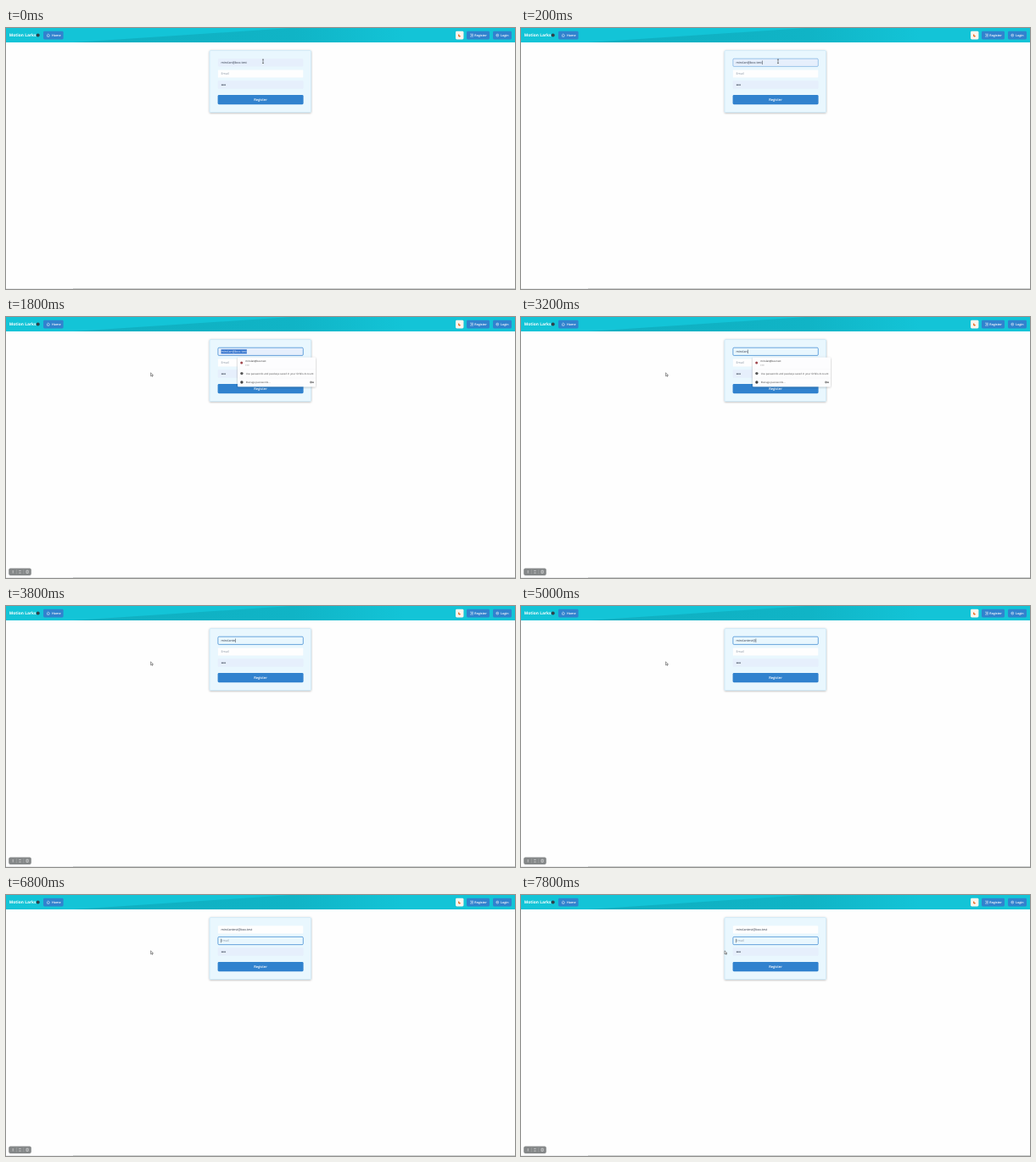
These frames come from a looping animation (600 px wide and 308 px high, 8 s). An HTML page:

```html
<!DOCTYPE html>
<html lang="en">
<head>
<meta charset="utf-8">
<title>Register form</title>
<style>
  html, body { margin: 0; width: 100%; height: 100%; overflow: hidden; background: #fefefe; }
  svg { display: block; width: 600px; height: 308px; }
  text { font: 3.7px "Open Sans", "Noto Sans", sans-serif; fill: #2d3748; text-rendering: geometricPrecision; white-space: pre; }
  .bold { font-weight: 600; fill: #fff; }
  .brand { font-size: 4.8px; font-weight: 700; fill: #fff; }
  .hint { fill: #8c97a6; }
  .small { font-size: 2.95px; fill: #444; }
  .btn { fill: #3182ce; }
  .line { fill: none; stroke: #fff; stroke-width: .5; }
</style>
</head>
<body>
<svg viewBox="0 0 600 308">
  <defs>
    <linearGradient id="wave">
      <stop offset="0" stop-color="#0fafc1"/>
      <stop offset=".5" stop-color="#10b4c6"/>
      <stop offset=".75" stop-color="#13c4d7"/>
    </linearGradient>
    <filter id="shade" x="-10%" y="-10%" width="120%" height="130%">
      <feDropShadow dx="0" dy=".7" stdDeviation=".9" flood-opacity=".3"/>
    </filter>
  </defs>

  <!-- header -->
  <path fill="#13c4d7" d="M0 0H600V17H0z"/>
  <path fill="url(#wave)" d="M79 17L335 0H600V17z"/>
  <text class="brand" x="3.8" y="10.4">Motion Larks</text>
  <circle cx="37.7" cy="8.6" r="2" fill="#30404a"/>
  <g class="btn">
    <rect x="44" y="3.8" width="23.6" height="9.6" rx="1.4"/>
    <rect x="543" y="3.8" width="27" height="9.6" rx="1.4"/>
    <rect x="574" y="3.8" width="22" height="9.6" rx="1.4"/>
  </g>
  <rect x="530" y="3.8" width="9.4" height="9.6" rx="1.4" fill="#fff5ee"/>
  <path d="M534.2 7.1A1.7 1.7 0 1 0 536.3 9.3A1.7 1.7 0 0 1 534.2 7.1z" fill="#dd6b20"/>
  <path class="line" d="M48 8.6L49.8 7L51.6 8.6M48.6 8.4V10.2H51V8.4"/>
  <path class="line" d="M547 7.2H551M548 8.6H551M547 10H551"/>
  <circle class="line" cx="579.3" cy="8.6" r="1.5"/>
  <path class="line" d="M578.2 8.6H580.2"/>
  <text class="bold" x="54" y="9.9">Home</text>
  <text class="bold" x="552.3" y="9.9" >Register</text>
  <text class="bold" x="583" y="9.9">Login</text>

  <!-- form -->
  <rect x="240" y="26.6" width="119.6" height="73" rx="1.2" fill="#e9f7fe" stroke="#bfe3f5" stroke-width=".6" filter="url(#shade)"/>
  <rect id="userBox" x="249.9" y="36.2" width="100.4" height="9.2" rx="1.2"/>
  <rect id="mailBox" x="249.9" y="49.4" width="100.4" height="9.2" rx="1.2"/>
  <rect x="249.6" y="62.2" width="101" height="9.6" rx="1.2" fill="#e6effc"/>
  <rect id="mark" x="253.5" y="38.3" height="5" fill="#2f70cc"/>
  <text id="user" x="253.5" y="42.1"></text>
  <text class="hint" x="253.5" y="55.3">Email</text>
  <g fill="#2d3748">
    <circle cx="254.4" cy="67.1" r=".65"/><circle cx="255.7" cy="67.1" r=".65"/>
    <circle cx="257" cy="67.1" r=".65"/><circle cx="258.3" cy="67.1" r=".65"/>
  </g>
  <rect class="btn" x="249.6" y="79" width="101" height="11.2" rx="1.4"/>
  <text class="bold" x="300" y="86" text-anchor="middle" style="font-size:4px">Register</text>
  <rect id="caret" width=".45" height="4.6" fill="#1a202c"/>

  <!-- saved password list -->
  <g id="list">
    <rect x="273" y="47.8" width="92" height="34.4" rx="1" fill="#fdfdfe" filter="url(#shade)"/>
    <path d="M273 61.6H365M273 72H365" stroke="#ececf0" stroke-width=".3"/>
    <circle cx="277.7" cy="54" r="1.5" fill="#a0464c"/>
    <text class="small" x="282.3" y="53" style="fill:#222">mirolan@box.test</text>
    <text class="small" x="282.3" y="58">••••</text>
    <circle cx="277.9" cy="66.6" r="1.7" fill="#555"/>
    <text class="small" x="282.8" y="67.6">Use passwords and passkeys saved in your Orbilo Account</text>
    <circle cx="277.9" cy="77" r="1.7" fill="#444"/>
    <text class="small" x="282.8" y="78">Manage passwords...</text>
    <path d="M359.8 77H363M362 77V78" stroke="#444" stroke-width=".7"/>
    <circle cx="359.4" cy="77" r=".9" fill="none" stroke="#444" stroke-width=".6"/>
  </g>

  <!-- recorder bar and page edge -->
  <g id="bar">
    <rect x="3.2" y="296.4" width="26.6" height="8.6" rx="2" fill="#858889"/>
    <path d="M12.5 298V303.4M20.7 298V303.4" stroke="#a9acad" stroke-width=".4"/>
    <path d="M8.2 299V302.4M15.3 299.4H17.6M15.3 302H17.6M24 299.2H26.2V302.2H24z" fill="none" stroke="#dedfe0" stroke-width=".7"/>
  </g>
  <path d="M0 307.6H79" stroke="#e2e5e6" stroke-width=".8"/>
  <path d="M79 307.6H600" stroke="#b9bcbd" stroke-width=".8"/>

  <!-- pointers -->
  <path id="beam" d="M-1 -2.2H1M0 -2.2V2.2M-1 2.2H1" fill="none" stroke="#222" stroke-width=".5"/>
  <path id="arrow" d="M-.9 -2V2L.1 1.1L.8 2.5L1.5 2.2L.8 .9H2z" fill="#fff" stroke="#222" stroke-width=".45"/>
</svg>
<script>
const $ = id => document.getElementById(id);
const show = (id, on) => $(id).setAttribute('visibility', on ? 'visible' : 'hidden');
const set = (id, attrs) => { for (const k in attrs) $(id).setAttribute(k, attrs[k]); };

const LOOP = 8000, TICK = 200, LEFT = 253.5;
const FIRST = 'mirolan@box.test', LAST = 'mirolantest@box.test';
// [time, number of letters typed]
const typed = [[2400, 1], [2600, 2], [2800, 4], [3000, 5], [3200, 7],
  [3600, 8], [3800, 9], [4200, 10], [4400, 11], [5000, 12],
  [5200, 13], [5400, 15], [5600, 16], [5800, 18], [6000, 20]];
// [time, x, y]
const moves = [[0, 303, 39.3], [1400, 270, 42], [1600, 210, 56], [1800, 171.5, 67.8],
  [7600, 204, 68.5], [7800, 241, 67.8]];
const at = (steps, t) => steps.filter(s => s[0] <= t).pop();

function box(id, focused, rest, focusFill, fading) {
  set(id, {
    fill: focused ? focusFill : rest,
    stroke: focused ? '#3182ce' : 'none',
    'stroke-width': .7, 'stroke-opacity': fading ? .6 : 1
  });
}

function draw(now) {
  const t = Math.floor(now % LOOP / TICK) * TICK;
  const step = at(typed, t), user = $('user');
  const userFocus = t >= 200 && t < 6600, mailFocus = t >= 6600;
  const filled = !step;

  user.textContent = step ? LAST.slice(0, step[1]) : FIRST;
  const width = user.getComputedTextLength();

  box('userBox', userFocus, filled ? '#e6effc' : '#fefefe', filled ? '#e6effc' : '#e9f7fe', t === 200);
  box('mailBox', mailFocus, '#fefefe', '#e9f7fe', t === 6600);

  const [, x, y] = at(moves, t);
  const selected = t >= 1400 && filled;
  const from = Math.min(Math.max(LEFT, x), LEFT + width);
  set('mark', { x: from, width: LEFT + width - from });
  show('mark', selected);
  user.style.fill = selected && t >= 1600 ? '#fff' : '';

  set('caret', { x: LEFT + (mailFocus ? -.2 : width + .2), y: mailFocus ? 51.7 : 38.5 });
  const blink = t === 800 || t === 1200 || t === 6200 || (t >= 7200 && t < 7600);
  show('caret', (userFocus || mailFocus) && !selected && !blink);

  show('list', t >= 400 && t < 3600);
  show('bar', t >= 600);

  const beam = t < 1600;
  set(beam ? 'beam' : 'arrow', { transform: `translate(${x} ${y})` });
  show('beam', beam);
  show('arrow', !beam);
}

const start = performance.now();
(function loop() {
  draw(performance.now() - start);
  requestAnimationFrame(loop);
})();
</script>
</body>
</html>
```
